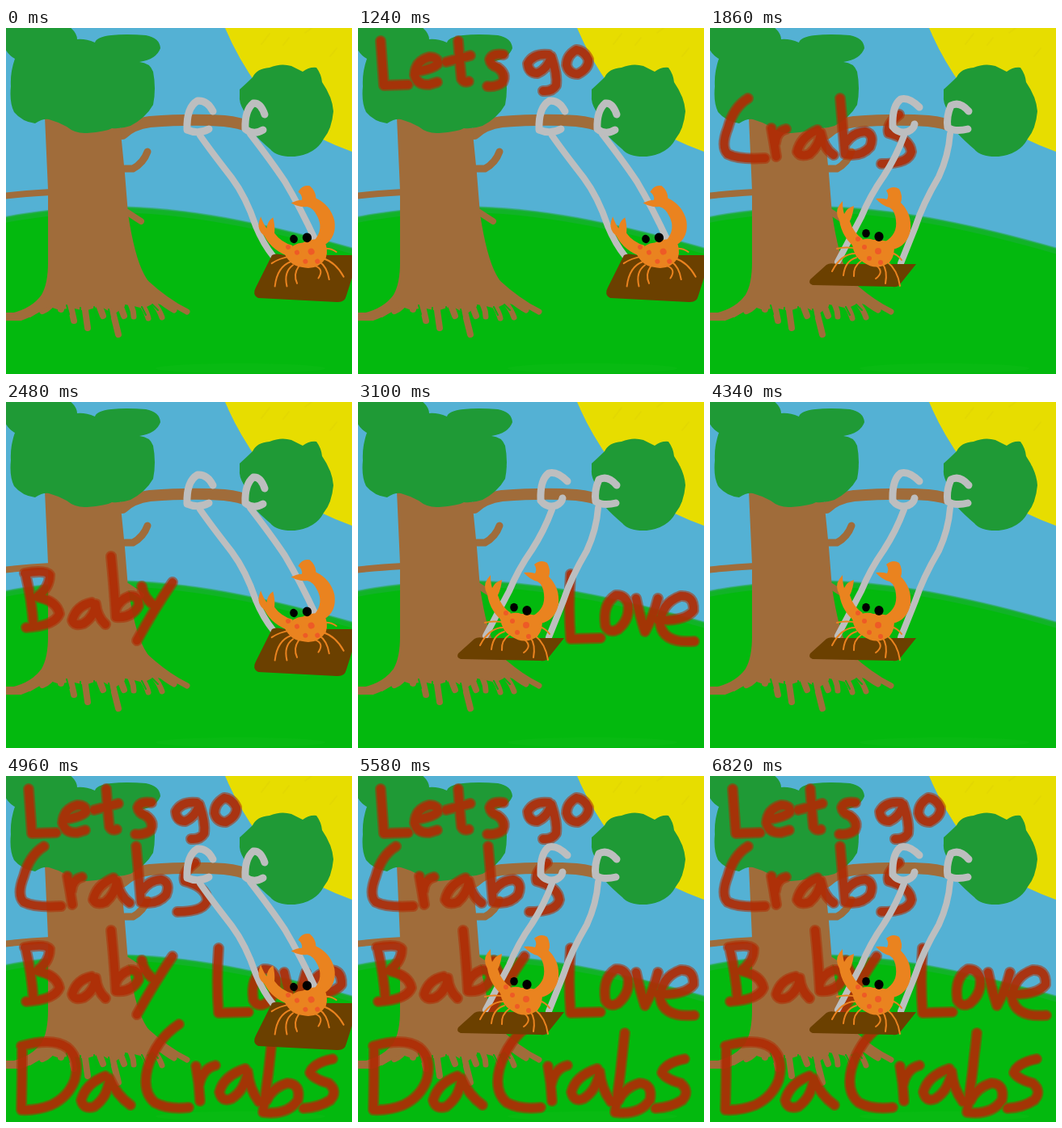
These frames come from a looping animation (428 by 428 pixels, 7.44 s). An HTML page:

```html
<!DOCTYPE html>
<html lang="en">
<head>
<meta charset="utf-8">
<title>Crab on a swing</title>
<style>
  html, body { margin: 0; width: 100%; height: 100%; overflow: hidden; background: #54b1d4; }
  svg { display: block; width: 100%; height: 100%; }
  .line { fill: none; stroke-linecap: round; stroke-linejoin: round; }
  .bark { stroke: #a06c3a; }
  .rope { stroke: #bdbebf; stroke-width: 8; }
  .ring { stroke: #bdbebf; stroke-width: 9; }
  .leg { stroke: #ea831f; stroke-width: 2; }
  .word { stroke: #b02c05; }
  .halo { stroke-width: 14; opacity: .55; }
  .core { stroke-width: 10; opacity: .85; }
</style>
</head>
<body>
<svg viewBox="0 0 428 428" preserveAspectRatio="none">
  <defs>
    <g id="crab">
      <g class="line leg">
        <path d="M182 273Q168 270 157 273M180 279Q162 279 151 301M181 284Q167 288 165 306M187 288Q177 295 178 307"/>
        <path d="M206 294Q216 302 205 310M213 291Q220 300 217 316M219 289Q232 299 235 319M224 278Q232 280 237 287"/>
      </g>
      <g fill="#ea831f">
        <path d="M205 211Q213 210 219 212Q222 207 218 201Q226 194 234 199Q239 208 236 216Q250 230 248 250Q244 270 226 274L217 264Q232 255 230 238Q229 226 222 222Q213 220 205 211Z"/>
        <path d="M160 238Q154 228 160 219L164 214Q164 224 166 230Q170 222 178 220Q177 231 173 239Q177 253 189 261L181 273Q163 259 160 238Z"/>
        <path d="M176 268Q190 258 202 262Q218 261 227 268Q230 280 222 290Q206 301 190 290Q178 284 176 268Z"/>
      </g>
      <g fill="#ee5a26">
        <circle cx="191" cy="271" r="3"/><circle cx="208" cy="276" r="4"/>
        <circle cx="197" cy="285" r="3"/><circle cx="183" cy="261" r="3"/>
        <circle cx="211" cy="290" r="3"/>
      </g>
      <ellipse cx="193" cy="254" rx="4.8" ry="5.2"/>
      <ellipse cx="209" cy="258" rx="5.6" ry="5.9"/>
    </g>
    <linearGradient id="edge" x1="0" y1="0" x2="0" y2="1">
      <stop offset="0" stop-color="#1da347"/>
      <stop offset="1" stop-color="#03b90e"/>
    </linearGradient>
  </defs>

  <rect width="428" height="428" fill="#54b1d4"/>
  <path fill="#e7dd00" d="M271 0Q287 38 313 74Q345 123 428 153V0Z"/>
  <g class="line" stroke="#d9cf08" stroke-width="2" opacity=".35">
    <path d="M316 20L326 7M343 21L350 12M370 6L378 0M401 35L409 25"/>
  </g>
  <path fill="#03b90e" d="M-4 235C40 226 100 221 150 222C240 225 335 246 432 274V432H-4Z"/>
  <g class="line" stroke="#22ab45">
    <path stroke-width="7" opacity=".45" d="M-4 238C40 229 100 224 150 225C240 228 335 249 432 277"/>
    <path stroke-width="3" opacity=".5" d="M-4 235C40 226 100 221 150 222C240 225 335 246 432 274"/>
  </g>
  <ellipse cx="290" cy="421" rx="105" ry="6" fill="#16bd1d" opacity=".3"/>

  <g class="line bark">
    <path stroke-width="14" d="M144 131Q156 119 178 116Q230 112 270 115Q290 117 302 123"/>
    <path stroke-width="9" d="M147 174H157Q170 167 175 153"/>
    <path stroke-width="8" d="M-4 208Q20 205 56 203M150 228L167 239"/>
    <path stroke-width="10" d="M-4 357H18Q40 350 52 335"/>
    <path stroke-width="8" d="M60 335Q55 346 45 350M70 338L68 348M78 335L84 362M96 335L101 371M112 335L120 356M128 335L139 379M138 335L146 356"/>
    <path stroke-width="7" d="M146 330Q158 344 158 357M154 328Q172 342 176 359M163 322Q186 338 193 358M172 314Q198 338 224 351M168 314Q190 340 208 349"/>
  </g>
  <path fill="#a06c3a" d="M48 110L52 200L52 290Q52 316 44 330Q32 347 6 353L30 358L52 344L66 349L80 346L98 350L116 344L134 354L150 342L170 347L184 340L205 346Q180 322 171 305Q159 283 151 230L147 180L141 120Z"/>
  <g class="line" stroke="#08b312" stroke-width="2">
    <path d="M75 343L78 354M92 346V357M109 345L112 360M127 348L129 358M148 343L152 352M168 345L173 355M181 342L188 349"/>
  </g>

  <g fill="#1f9a36">
    <path d="M-2 -2V24Q3 34 11 38Q5 55 6 72Q4 92 10 104Q20 116 36 118Q45 112 53 113Q64 116 75 122Q86 131 100 130Q124 128 131 124Q143 125 154 121Q173 111 182 95Q186 75 182 54Q178 43 165 42Q186 39 191 25Q190 12 173 9Q148 7 130 9Q112 11 110 18Q98 13 88 14Q88 6 78 -2Z"/>
    <path d="M289 76Q299 67 305 61Q310 50 326 49Q340 43 353 47L367 54Q375 48 384 49Q390 57 391 67Q404 86 405 103Q403 125 393 137Q383 156 357 159Q335 160 327 150Q314 139 305 129Q293 118 294 102Q288 92 289 84Z"/>
  </g>

  <g id="words"></g>

  <g id="right">
    <g class="line rope">
      <path d="M240 133Q254 153 279 185Q297 209 309 245Q318 267 331 283M302 131Q329 166 345 190Q364 222 383 263"/>
    </g>
    <g class="line ring">
      <path d="M256 103Q249 89 237 90Q223 98 224 126Q238 132 251 125M320 107Q315 92 306 93Q295 102 296 125Q306 133 318 126"/>
    </g>
    <path fill="#6b4000" d="M329 281Q333 278 345 281L428 281V309L421 331Q419 340 409 339L312 334Q304 330 309 321Z"/>
    <use href="#crab" transform="translate(356 261) rotate(-20) translate(-193 -254)"/>
  </g>
  <g id="left">
    <g class="line rope">
      <path d="M240 133Q230 160 215 183Q198 207 187 234L158 289M297 131Q295 158 283 184Q263 218 254 246L236 291"/>
    </g>
    <g class="line ring">
      <path d="M259 98Q246 85 236 88Q225 96 226 122Q234 132 245 128Q252 125 253 119M320 103Q309 90 298 96Q292 110 294 123Q303 129 319 125"/>
    </g>
    <path fill="#6b4000" d="M144 293Q148 290 156 292L255 292L235 317Q232 321 226 320L127 318Q121 316 124 311Z"/>
    <use href="#crab"/>
  </g>
</svg>
<script>
const NS = "http://www.w3.org/2000/svg";
const STEP = 620;

// Brush lettering, one path per letter
const WORDS = {
  "Lets go": [
    "M28 16Q30 45 32 71L62 70",
    "M71 54Q93 51 99 44Q99 36 88 36Q71 41 70 58Q73 71 88 70L98 67",
    "M124 16Q126 45 128 63Q131 68 137 66M109 42L139 34",
    "M180 33Q166 31 163 39Q164 46 173 49Q184 57 179 67Q172 73 160 72",
    "M236 33Q217 31 210 44Q211 56 222 56Q235 50 239 35Q247 58 245 71Q240 79 229 78",
    "M270 27Q258 34 258 46Q261 57 272 57Q286 50 285 39Q280 28 270 27"
  ],
  "Crabs": [
    "M47 87Q29 98 22 124Q13 147 22 156Q36 163 68 161",
    "M76 124Q79 140 82 159M81 142Q82 128 94 125",
    "M133 126Q112 135 108 153Q112 160 123 156Q135 146 137 130Q141 149 153 157",
    "M161 87Q164 120 167 156Q187 160 198 147Q204 132 192 128Q177 129 168 142",
    "M234 107Q218 119 221 130Q247 137 249 153Q246 168 212 168"
  ],
  "Baby": [
    "M24 212Q32 245 34 278M23 212Q48 207 54 214Q54 230 38 241Q63 246 66 262Q60 277 25 279",
    "M106 248Q87 252 82 270Q85 278 96 274Q109 266 111 250Q113 266 123 275",
    "M130 191Q134 230 136 266Q155 268 164 252Q165 239 153 240Q140 245 136 256",
    "M168 228Q170 243 184 252M206 223Q184 255 162 295"
  ],
  "Love": [
    "M263 213Q260 255 263 293L300 292",
    "M319 239Q302 250 306 277Q311 287 322 281Q337 268 334 249Q329 238 319 239",
    "M344 243Q349 266 355 284Q366 264 371 243",
    "M371 270Q405 271 415 258Q416 239 399 240Q374 249 374 276Q379 299 416 296"
  ],
  "Da Crabs": [
    "M20 335Q20 375 19 412M19 334Q58 323 76 336Q92 350 85 376Q77 397 56 407Q38 414 19 413",
    "M123 371Q99 380 93 401Q96 413 109 409Q126 397 128 374Q137 395 154 407",
    "M214 307Q185 326 175 362Q168 390 184 404Q201 413 226 410",
    "M235 359Q239 380 240 402M239 382Q243 362 259 358",
    "M296 362Q269 371 264 391Q267 404 279 399Q295 389 299 366Q301 387 313 403",
    "M330 318Q325 368 318 416Q348 420 361 401Q365 381 348 380Q330 385 322 402",
    "M404 350Q380 355 376 367Q381 375 399 380Q411 390 401 401Q387 410 368 411"
  ]
};
const ALL = Object.keys(WORDS);

// One entry per step: swing side and visible words
const STEPS = [
  ["right", []], ["left", []],
  ["right", ["Lets go"]], ["left", ["Crabs"]],
  ["right", ["Baby"]], ["left", ["Love"]],
  ["right", ["Da Crabs"]], ["left", []],
  ["right", ALL], ["left", ALL],
  ["right", ALL], ["left", ALL]
];

const byId = id => document.getElementById(id);

function add(parent, tag, attrs) {
  const node = document.createElementNS(NS, tag);
  for (const key in attrs) node.setAttribute(key, attrs[key]);
  return parent.appendChild(node);
}

const groups = {};
for (const word of ALL) {
  const g = groups[word] = add(byId("words"), "g", { class: "line word", role: "img", "aria-label": word });
  const d = WORDS[word].join("");
  add(g, "path", { class: "halo", d });
  add(g, "path", { class: "core", d });
}

const show = (node, on) => { node.style.display = on ? "" : "none"; };
let current = -1;

function draw(now) {
  const index = Math.floor(now / STEP) % STEPS.length;
  if (index !== current) {
    current = index;
    const [side, words] = STEPS[index];
    for (const id of ["left", "right"]) show(byId(id), id === side);
    for (const word of ALL) show(groups[word], words.includes(word));
  }
}

const start = performance.now();
function tick() {
  draw(performance.now() - start);
  requestAnimationFrame(tick);
}
tick();
</script>
</body>
</html>
```
